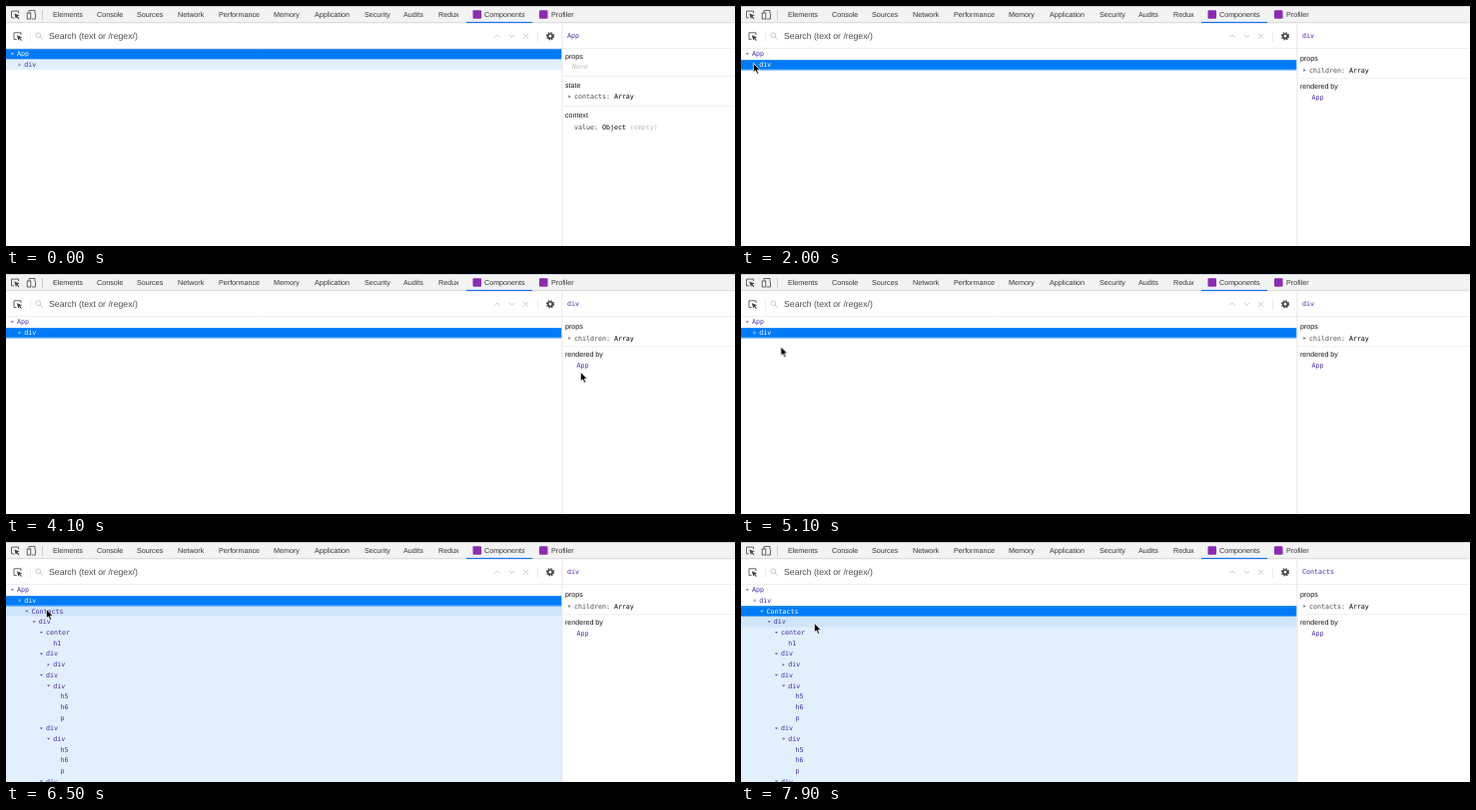
Write an HTML page that moves like this. It is 730x241 px and loops after 8 s.

```html
<!DOCTYPE html>
<html lang="en">
<head>
<meta charset="utf-8">
<title>Component tree</title>
<style>
html, body { margin: 0; width: 100%; height: 100%; overflow: hidden; background: #fff; }
svg { display: block; width: 100%; height: 100%; }
text { font: 7.17px "Liberation Sans", Arial, sans-serif; fill: #333; white-space: pre; text-rendering: geometricPrecision; }
.search { font-size: 8.7px; fill: #4c4c4c; }
.head { font-size: 7.1px; fill: #111; }
.mono, .row text { font: 6.64px "DejaVu Sans Mono", monospace; }
.mono { fill: #484848; }
.name { fill: #4530a0; }
.val { fill: #000; }
.dim { fill: #bbb; }
.icon { fill: none; stroke: #555; stroke-width: .9; }
.pale { stroke: #c4c4c4; }
.line { stroke: #eee; stroke-width: 1; }
.row { color: #4530a0; }
.row text { fill: currentColor; }
.row path { fill: currentColor; fill-opacity: .75; }

/* every state runs on one 8 s clock, nudged past the step edges */
.t { animation: 8s step-end -4ms infinite; }
#panelApp, #tintDiv { animation-name: early; }
#panelDiv { animation-name: middle; }
#panelContacts { animation-name: late; }
#tree, #kids { animation-name: opened; }
#pick { animation-name: pick; }
#hover { animation-name: hover; }
#row0 { animation-name: whiteEarly; }
#row1 { animation-name: whiteMiddle; }
#row2 { animation-name: whiteLate; }
#row1 path { animation: turn 8s step-end -4ms infinite; transform-box: fill-box; transform-origin: center; }
#cursor { animation-name: move; }
#arrow { animation-name: enter; }

@keyframes early { 0% { opacity: 1 } 23.75%, 100% { opacity: 0 } }
@keyframes middle { 0% { opacity: 0 } 23.75% { opacity: 1 } 83.75%, 100% { opacity: 0 } }
@keyframes late { 0% { opacity: 0 } 83.75%, 100% { opacity: 1 } }
@keyframes opened { 0% { opacity: 0 } 72.5%, 100% { opacity: 1 } }
@keyframes whiteEarly { 0% { color: #fff } 23.75%, 100% { color: #4530a0 } }
@keyframes whiteMiddle { 0% { color: #4530a0 } 23.75% { color: #fff } 83.75%, 100% { color: #4530a0 } }
@keyframes whiteLate { 0% { color: #4530a0 } 83.75%, 100% { color: #fff } }
@keyframes turn { 0% { transform: rotate(-90deg) } 72.5%, 100% { transform: none } }
@keyframes enter { 0% { opacity: 0 } 1.25%, 100% { opacity: 1 } }
@keyframes pick {
  0% { transform: none }
  23.75% { transform: translateY(10.68px) }
  83.75%, 100% { transform: translateY(21.36px) }
}
@keyframes hover {
  0% { transform: translateY(-80px) }
  80% { transform: translateY(21.36px) }
  83.75% { transform: translateY(-80px) }
  86.25% { transform: translateY(64.08px) }
  91.25% { transform: translateY(138.84px) }
  93.75% { transform: translateY(106.8px) }
  96.25% { transform: translateY(85.44px) }
  97.5% { transform: translateY(53.4px) }
  98.75%, 100% { transform: translateY(32.04px) }
}
@keyframes move {
  0%, 1.25% { transform: translate(477px, 215px) }
  2.5%, 5% { transform: translate(443px, 110px) }
  6.25% { transform: translate(320px, 115px) }
  7.5% { transform: translate(181px, 98px) }
  10% { transform: translate(181px, 98px); animation-timing-function: steps(2) }
  12.5% { transform: translate(14px, 62px) }
  16.25% { transform: translate(19px, 66px) }
  17.5% { transform: translate(22px, 77px); animation-timing-function: steps(3) }
  21.25% { transform: translate(12px, 57px) }
  31.25% { transform: translate(12px, 57px); animation-timing-function: steps(5) }
  37.5% { transform: translate(377px, 122px); animation-timing-function: steps(4) }
  42.5% { transform: translate(576px, 90px); animation-timing-function: steps(2) }
  45% { transform: translate(583px, 80px); animation-timing-function: steps(2) }
  47.5% { transform: translate(570px, 84px); animation-timing-function: steps(3) }
  51.25% { transform: translate(575px, 98px); animation-timing-function: steps(2) }
  53.75% { transform: translate(573px, 99px) }
  56.25% { transform: translate(520px, 110px); animation-timing-function: steps(2) }
  58.75% { transform: translate(60px, 84px) }
  60% { transform: translate(60px, 84px); animation-timing-function: steps(7) }
  68.75% { transform: translate(12px, 57px) }
  72.5% { transform: translate(12px, 57px); animation-timing-function: steps(7) }
  81.25% { transform: translate(40px, 67px) }
  83.75% { transform: translate(40px, 67px); animation-timing-function: steps(4) }
  88.75% { transform: translate(464px, 132px); animation-timing-function: steps(2) }
  91.25% { transform: translate(478px, 179px); animation-timing-function: steps(2) }
  93.75% { transform: translate(430px, 157px) }
  95% { transform: translate(430px, 157px); animation-timing-function: steps(3) }
  98.75%, 100% { transform: translate(73px, 81px) }
}
</style>
</head>
<body>
<svg viewBox="0 0 730 241" preserveAspectRatio="none">
  <defs>
    <g id="inspect" class="icon">
      <path d="M7.5 3V.8H.5V7.5H3"/>
      <path d="M3.3 3.2 8.6 5.3 6.5 6.2 8.4 8.2 7.6 8.9 5.8 7 4.9 8.8z" fill="#444" stroke="none"/>
    </g>
    <path id="side" d="M0 0v3.4l2.3-1.7z" fill="#777"/>
  </defs>

  <!-- tab bar -->
  <rect width="730" height="17" fill="#f3f3f3"/>
  <rect width="730" height=".8" fill="#c6d4e0"/>
  <rect y="16.4" width="730" height=".8" fill="#d0d0d0"/>
  <path class="line" d="M36.5 4V14" style="stroke:#ccc"/>
  <use href="#inspect" x="5" y="4.3"/>
  <g class="icon">
    <path d="M23 4.5V4.5H29V8M23 4.5V7"/>
    <rect x="21.2" y="7" width="3.6" height="6"/>
    <path d="M26 13H29.5V8"/>
  </g>
  <g id="tabs"></g>
  <rect x="467.5" y="4.3" width="8.5" height="8.5" rx="1" fill="#8a2bb0"/>
  <rect x="534" y="4.3" width="8.5" height="8.5" rx="1" fill="#8a2bb0"/>
  <rect x="461" y="15.9" width="66" height="1.2" fill="#1a73e8"/>

  <!-- search bar -->
  <use href="#inspect" x="7.5" y="26"/>
  <path class="line" d="M24.5 25V36M532.5 25V36"/>
  <g class="icon pale">
    <circle cx="32.3" cy="29.3" r="2.4"/>
    <path d="M34 31 36.8 33.8M489.3 31.5 491.8 29 494.3 31.5M503.9 29 506.4 31.5 508.9 29M518 27.8 523 32.8M523 27.8 518 32.8"/>
  </g>
  <text class="search" x="43" y="33.2">Search (text or /regex/)</text>
  <circle cx="545" cy="30.3" r="2.3" fill="none" stroke="#444" stroke-width="1.7"/>
  <circle cx="545" cy="30.3" r="3.6" fill="none" stroke="#444" stroke-width="1.1" stroke-dasharray="1.5 1.327"/>
  <path class="line" d="M0 42.5H730"/>

  <!-- component tree -->
  <rect id="tintDiv" class="t" y="53.5" width="556.6" height="10.5" fill="#e2effd"/>
  <rect id="tree" class="t" y="64" width="556.6" height="177" fill="#e2effd"/>
  <rect id="hover" class="t" y="43" width="556.6" height="10.4" fill="#cfe5fa"/>
  <rect id="pick" class="t" y="43.2" width="556.6" height="10.2" fill="#007bf5"/>
  <g id="top"></g>
  <g id="kids" class="t"></g>

  <!-- inspector -->
  <path class="line" d="M556.9 18V241" style="stroke:#e6e6e6"/>
  <g id="panelApp" class="t">
    <text class="mono name" x="562" y="32.3">App</text>
    <text class="head" x="560" y="52.6">props</text>
    <text class="mono dim" x="567" y="62.8" style="font-style:italic">None</text>
    <path class="line" d="M558 70.5H730M558 100.5H730"/>
    <text class="head" x="560" y="81.6">state</text>
    <use href="#side" x="563.3" y="89.4"/>
    <text class="mono" x="569" y="93.4">contacts: <tspan class="val">Array</tspan></text>
    <text class="head" x="560" y="111.8">context</text>
    <text class="mono" x="569" y="123.8">value: <tspan class="val">Object</tspan> <tspan class="dim">(empty)</tspan></text>
  </g>
  <g id="panelDiv" class="t"></g>
  <g id="panelContacts" class="t"></g>

  <g id="cursor" class="t">
    <path id="arrow" class="t" d="M.4.5V9.7L2.5 7.8 4 11.2 5.6 10.5 4.2 7.2H7z" fill="#000" stroke="#fff" stroke-width=".7"/>
  </g>
</svg>
<script>
const el = id => document.getElementById(id);

const tabs = { Elements: 47, Console: 91, Sources: 131, Network: 172, Performance: 213, Memory: 268,
  Application: 309, Security: 359, Audits: 398, Redux: 433, Components: 479, Profiler: 546 };
el("tabs").innerHTML = Object.entries(tabs)
  .map(([name, x]) => `<text x="${x}" y="11.1">${name}</text>`).join("");

// the digit is the depth; "+" marks a folded node, "-" a leaf
const card = "4div 5div 6-h5 6-h6 6-p";
const nodes = `0App 1div 2Contacts 3div 4center 5-h1 4div 5+div ${card} ${card} 4div`.split(" ");

function row(node, i) {
  const [, depth, mark, name] = node.match(/(\d)([+-]?)(.+)/);
  const x = 11 + 7.25 * depth, y = 42.8 + 10.68 * i;
  const shape = mark === "+" ? "M.6 0v3l2-1.5z" : "M0 .4h3.2l-1.6 2z";
  const arrow = mark === "-" ? "" :
    `<g transform="translate(${x - 6.2} ${y + 4.1})"><path d="${shape}"/></g>`;
  return `<g class="row t" id="row${i}">${arrow}<text x="${x}" y="${y + 7.6}">${name}</text></g>`;
}
const rows = nodes.map(row);
el("top").innerHTML = rows.slice(0, 2).join("");
el("kids").innerHTML = rows.slice(2).join("");

const panel = (name, prop) => `
  <text class="mono name" x="562" y="32.3">${name}</text>
  <text class="head" x="560" y="54.6">props</text>
  <use href="#side" x="563.3" y="62.7"/>
  <text class="mono" x="569" y="66.7">${prop}: <tspan class="val">Array</tspan></text>
  <path class="line" d="M558 72.8H730"/>
  <text class="head" x="560" y="83.4">rendered by</text>
  <text class="mono name" x="571.5" y="93.6">App</text>`;
el("panelDiv").innerHTML = panel("div", "children");
el("panelContacts").innerHTML = panel("Contacts", "contacts");
</script>
</body>
</html>
```
